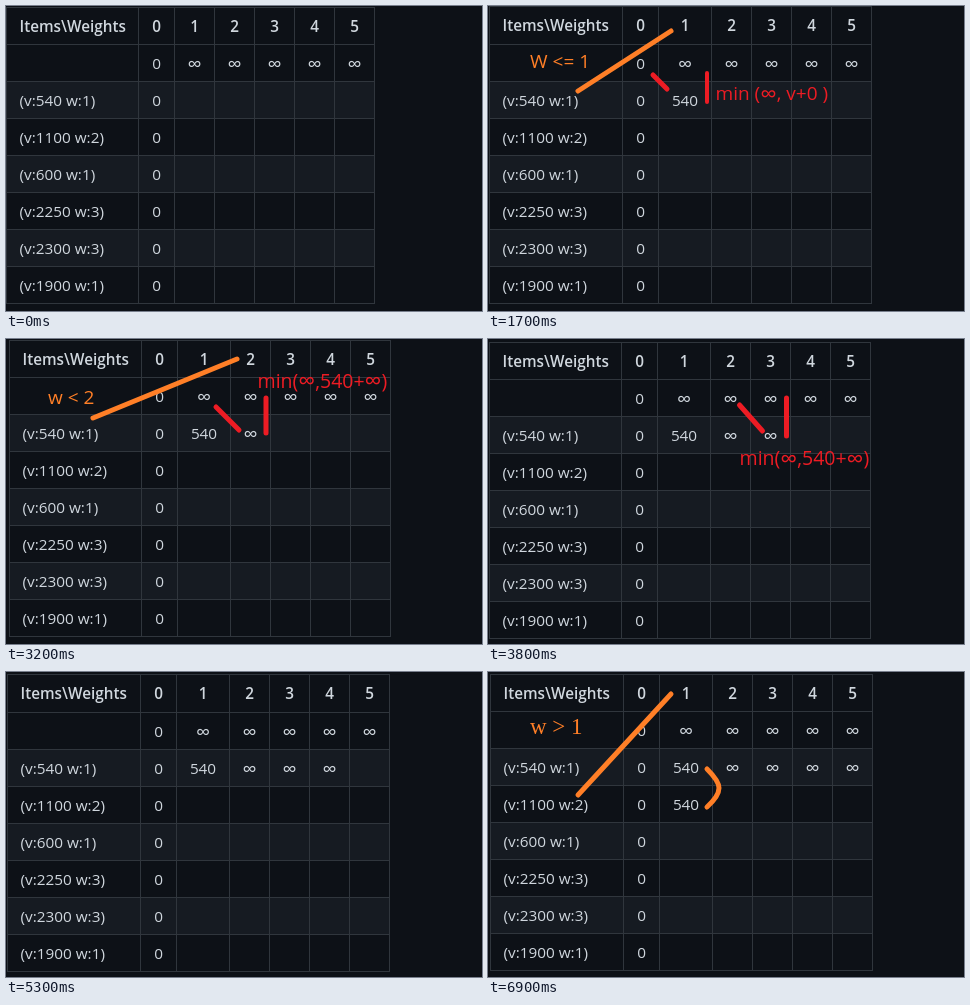
These frames come from a looping animation (476x305 px, 8 s). An HTML page:

```html
<!DOCTYPE html>
<html lang="en">
<head>
<meta charset="utf-8">
<title>Knapsack table</title>
<style>
html, body { margin: 0; width: 100%; height: 100%; overflow: hidden; background: #0d1117; }
svg { display: block; width: 100vw; height: 100vh; }
text { font-family: "Open Sans", "Noto Sans", sans-serif; }
.cell { font-size: 15.3px; fill: #d0d7de; }
.head { font-weight: 600; }
.mid { text-anchor: middle; }
.inf { font-size: 20px; }
.grid { stroke: #30363d; fill: none; shape-rendering: crispEdges; }
.stripe { fill: #161b22; shape-rendering: crispEdges; }
.pen { fill: none; stroke-linecap: round; stroke-linejoin: round; }
.serif { font-family: "Liberation Serif", serif; }
</style>
</head>
<body>
<svg id="stage" viewBox="0 0 476 305"></svg>
<script>
const LOOP = 8000, ROW = 37, BASE = 24.5;
const ORANGE = '#ff7f27', RED = '#ed1c24';
const items = ['', '(v:540 w:1)', '(v:1100 w:2)', '(v:600 w:1)',
  '(v:2250 w:3)', '(v:2300 w:3)', '(v:1900 w:1)'];
const stage = document.getElementById('stage');

const rect = (x, y, w, h) => `<rect class="stripe" x="${x}" y="${y}" width="${w}" height="${h}"/>`;
const label = (x, y, s, cls = '') => `<text class="cell ${cls}" x="${x}" y="${y}">${s}</text>`;
const infinity = (x, y) => `<text class="cell mid inf" x="${x}" y="${y + 2}">∞</text>`;
const pen = (color, d, w = 5) => `<path class="pen" stroke="${color}" stroke-width="${w}" d="${d}"/>`;

// The infinity sign is drawn larger than the letters around it.
function note(color, x, y, s, size = 19, cls = '') {
  const rich = s.replace(/∞/g, `<tspan font-size="${size * 1.23}" dy="1.5">∞</tspan><tspan dy="-1.5">&#8203;</tspan>`);
  return `<text class="${cls}" fill="${color}" font-size="${size}" x="${x}" y="${y}">${rich}</text>`;
}

// left, top: table corner; col: first inner column line; body: top of the body rows;
// head: line under the header; filled, next: values in the first two item rows
const steps = [
  { at: 0, left: 0, top: 1, col: 132, body: 38, filled: 0, wide: 40, marks: '' },
  { at: 800, left: 1, top: 0, col: 134, body: 38, filled: 1, marks:
    pen(ORANGE, 'M90 85L183 25') + pen(RED, 'M165 69L179 83') + pen(RED, 'M219 67V96', 4) +
    note(ORANGE, 42, 62, 'W &lt;= 1') + note(RED, 227.5, 94, 'min (∞, v+0 )') },
  { at: 2300, left: 3, top: 1, col: 135, body: 38, filled: 2, marks:
    pen(ORANGE, 'M87 79L231 20') + pen(RED, 'M210 68L233 91') + pen(RED, 'M260 59V94') +
    note(ORANGE, 42, 65, 'w &lt; 2') + note(RED, 251.5, 48.5, 'min(∞,540+∞)', 19.5) },
  { at: 3800, left: 1, top: 3, col: 133, body: 40, filled: 3, marks:
    pen(RED, 'M251.5 66L274.5 92') + pen(RED, 'M298.5 59V97') +
    note(RED, 251.5, 126, 'min(∞,540+∞)', 19.5) },
  { at: 5300, left: 1, top: 2, col: 134, body: 40, filled: 4, marks: '' },
  { at: 6100, left: 2, top: 2, col: 135, head: 39, body: 40, filled: 5, marks: '' },
  { at: 6900, left: 2, top: 2, col: 135, body: 39, filled: 5, next: 1, marks:
    pen(ORANGE, 'M90 123L183 22') + pen(ORANGE, 'M219 97Q231 109 231 116Q231 124 219 135') +
    note(ORANGE, 42, 62, 'w &gt; 1', 23, 'serif') }
];

function table({ left, top, col, body, head = body, filled, next = 0, wide = 53 }) {
  const xs = [left, col, col + 36];
  for (let i = 0; i < 5; i++) xs.push(col + 36 + wide + 40 * i);
  const right = xs[7], bottom = body + ROW * items.length;
  const mid = c => (xs[c + 1] + xs[c + 2] + 1) / 2;
  const textX = left + 13.5;
  let out = '', lines = '';

  for (let r = 1; r < items.length; r += 2) out += rect(left, body + ROW * r, right - left, ROW);
  for (const x of xs) lines += `M${x + .5} ${top}V${bottom + 1}`;
  const rows = [top, head, ...items.map((_, r) => body + ROW * (r + 1))];
  for (const y of rows) lines += `M${left} ${y + .5}H${right + 1}`;
  out += `<path class="grid" d="${lines}"/>`;

  out += label(textX, top + BASE, 'Items\\Weights', 'head');
  for (let c = 0; c <= 5; c++) out += label(mid(c), top + BASE, c, 'head mid');

  const counts = [5, filled, next];
  items.forEach((name, r) => {
    const y = body + ROW * r + BASE;
    out += label(textX, y, name) + label(mid(0), y, 0, 'mid');
    for (let c = 1; c <= (counts[r] || 0); c++)
      out += r > 0 && c === 1 ? label(mid(c), y, 540, 'mid') : infinity(mid(c), y);
  });
  return out;
}

let shown = null;
function draw(ms) {
  const t = ms % LOOP;
  const step = steps.findLast(s => t >= s.at);
  if (step === shown) return;
  shown = step;
  stage.innerHTML = table(step) + step.marks;
}

const start = performance.now();
function tick() {
  draw(performance.now() - start);
  requestAnimationFrame(tick);
}
tick();
</script>
</body>
</html>
```
